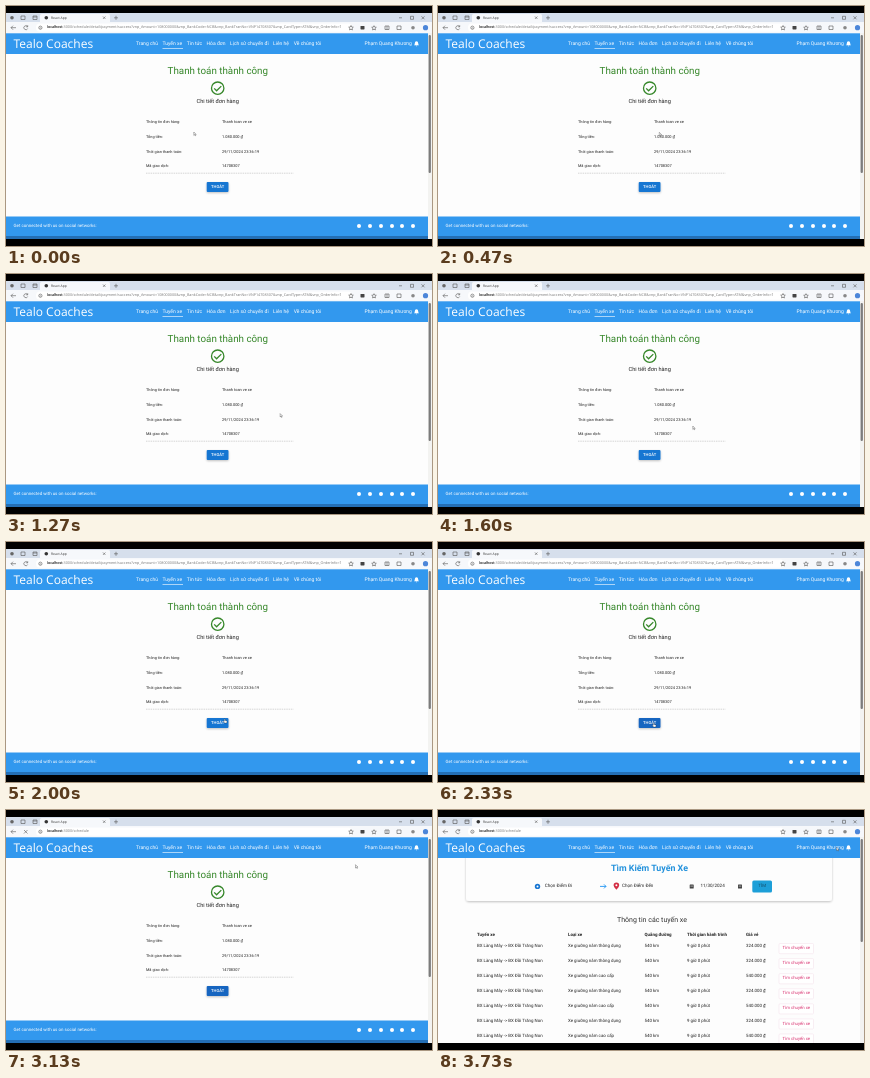
Recreate the animation shown at these times as an HTML page. Size 426 by 240 pixels, loop 3790 ms.

```html
<!DOCTYPE html>
<html lang="vi">
<head>
<meta charset="utf-8">
<style>
  html, body { margin: 0; width: 100%; height: 100%; overflow: hidden; background: #000; }
  svg { display: block; width: 100vw; height: 100vh; font-family: Roboto, sans-serif; }
  text { text-rendering: geometricPrecision; dominant-baseline: central; white-space: pre; }
  .line { fill: none; stroke: #555; stroke-width: .6; }
  .ui { font-family: "Open Sans", sans-serif; }
</style>
</head>
<body>
<svg id="stage" viewBox="0 0 426 240">
  <defs>
    <clipPath id="screen"><rect y="7" width="426" height="226"/></clipPath>
    <clipPath id="field"><rect x="30" y="16" width="305" height="12"/></clipPath>
    <filter id="shadow" x="-20%" y="-30%" width="140%" height="180%">
      <feDropShadow dx="0" dy="1" stdDeviation="1.3" flood-opacity=".24"/>
    </filter>
  </defs>
  <rect width="426" height="240"/>
  <g clip-path="url(#screen)">
    <rect y="7" width="426" height="226" fill="#fdfdfd"/>
    <g id="success"></g>
    <g id="schedule"></g>
    <g id="nav"></g>
    <g id="browser"></g>
    <g id="scroll">
      <rect x="422" y="27" width="4" height="206" fill="#f3f3f1"/>
      <rect id="thumb" x="422.6" y="29" width="2.3" rx="1" fill="#7c7c7c"/>
    </g>
    <g id="cursor">
      <g transform="translate(-1.2 -2) scale(.8)" fill="#fff" stroke="#222" stroke-width=".4">
        <path id="arrow" d="M0 0V4.2L1 3.3 1.7 4.8 2.4 4.5 1.7 3H3Z"/>
        <path id="hand" d="M-.6 .2Q0-.5 .5 .2V2L2.4 2.4Q3 2.6 2.8 3.4L2.3 5H-.3L-1.7 3Q-1.5 2.3-.6 2.8Z"/>
      </g>
    </g>
  </g>
</svg>
<script>
const $ = id => document.getElementById(id);
const text = (x, y, str, size, fill = '#222', extra = '') =>
  `<text x="${x}" y="${y}" font-size="${size}" fill="${fill}" ${extra}>${str}</text>`;
const rect = (x, y, w, h, fill, extra = '') =>
  `<rect x="${x}" y="${y}" width="${w}" height="${h}" fill="${fill}" ${extra}/>`;
const dot = (x, y, r, fill) => `<circle cx="${x}" cy="${y}" r="${r}" fill="${fill}"/>`;
const line = (d, extra = '') => `<path class="line" d="${d}" ${extra}/>`;
const mid = 'text-anchor="middle"', bold = 'font-weight="700"', ui = 'class="ui"';
const blue = '#3298ee', green = '#36872a';

// Browser frame
const path = 'schedule/detail/payment/success?vnp_Amount=108000000&amp;vnp_BankCode=NCB&amp;vnp_BankTranNo=VNP14708307&amp;vnp_CardType=ATM&amp;vnp_OrderInfo=Thanh+toan+ve+xe';
const address = (id, rest) => `<g id="${id}" clip-path="url(#field)">` +
  text(41, 21.9, `localhost:3000/${rest}`, 3.72, '#777', ui) +
  text(41, 21.9, 'localhost', 3.72, '#222', ui) + '</g>';
$('browser').innerHTML =
  rect(0, 7, 426, 9.5, '#d6dfec') + rect(0, 16, 426, 11.3, '#f6f8fb') +
  rect(34, 8, 70, 9, '#f6f8fb', 'rx="1.5"') + rect(30, 17.5, 316, 8.3, '#fff', 'rx="4"') +
  dot(6, 11.8, 1.8, '#666') + line('M15 10h4v3.5h-4zM27 10h4v3.5h-4zM27 11h4') +
  dot(40.3, 11.8, 1.8, '#333') + text(45, 11.8, 'React App', 3.4, '#333', ui) +
  line('M97 10.5l2.4 2.4m0-2.4l-2.4 2.4M108 11.8h4m-2-2v4') +
  line('M393 11.8h3M404.5 10.3h3v3h-3zM415.5 10.3l3 3m0-3l-3 3') +
  line('M10 21.7H5m2-2l-2 2 2 2') +
  line('M21.6 20.7a2 2 0 1 0 .1 1.8M21.7 19.2v1.6h-1.6', 'id="reload"') +
  line('M18 20l3.5 3.5m0-3.5L18 23.5', 'id="stop"') +
  line('M36 21.7a1.6 1.6 0 1 1-3.2 0a1.6 1.6 0 1 1 3.2 0M34.4 21.4v1') +
  address('longUrl', path) + address('shortUrl', 'schedule') +
  line('M345 19.5l.7 1.5 1.6.2-1.2 1.1.3 1.7-1.4-.8-1.4.8.3-1.7-1.2-1.1 1.6-.2z') +
  rect(354.5, 20, 4, 3.4, '#444', 'rx=".6"') +
  line('M368 19.7l.7 1.4 1.6.2-1.2 1.1.3 1.6-1.4-.8-1.4.8.3-1.6-1.2-1.1 1.6-.2zM379 20h4v3.5h-4zM381 20v3.5M391 20h4v3.5h-4z') +
  dot(407, 21.7, 1.8, '#888') + dot(419.5, 21.7, 2.6, '#4c86d9');

// Site header
const links = [[130, 'Trang chủ'], [156.5, 'Tuyến xe'], [180.7, 'Tin tức'], [200.5, 'Hóa đơn'],
  [224, 'Lịch sử chuyến đi'], [267, 'Liên hệ'], [287.7, 'Về chúng tôi']];
$('nav').innerHTML = rect(0, 27, 422, 21, blue) +
  text(7.5, 37.4, 'Tealo Coaches', 12, '#fff', ui) +
  links.map(([x, label]) => text(x, 37.6, label, 5, '#fff')).join('') +
  rect(156.5, 42.3, 20.5, .6, '#fff') + text(358.5, 37.8, 'Phạm Quang Khương', 5, '#fff') +
  '<path d="M408 39.2q.8-.5.8-2 0-1.7 1.7-1.9 1.7.2 1.7 1.9 0 1.5.8 2zM409.8 39.7h1.4l-.7.7z" fill="#fff"/>';

// Payment confirmation
const details = [['Thông tin đơn hàng:', 'Thanh toan ve xe'], ['Tổng tiền:', '1.080.000 ₫'],
  ['Thời gian thanh toán:', '29/11/2024 23:36:19'], ['Mã giao dịch:', '14708307']];
$('success').innerHTML =
  text(211.8, 65, 'Thanh toán thành công', 9.8, green, mid) +
  `<g fill="none" stroke="${green}" stroke-width="1.3"><circle cx="211.7" cy="82.2" r="6.2"/>` +
  '<path d="M208.2 82.4l2.4 2.4 4.7-4.7"/></g>' +
  text(211.7, 95.6, 'Chi tiết đơn hàng', 5.6, '#222', mid) +
  details.map(([label, value], i) =>
    text(140, 115.6 + i * 14.7, label, 3.85) + text(216, 115.6 + i * 14.7, value, 3.95)).join('') +
  line('M140 167.2H287.5', 'stroke-dasharray="1.5 .8" style="stroke:#bbb"') +
  rect(200.7, 176, 21.8, 10, '#1976d2', 'id="exit" rx="1" filter="url(#shadow)"') +
  text(211.6, 181, 'THOÁT', 4.1, '#fff', `${mid} font-weight="500"`) +
  rect(0, 210.5, 422, 19.5, blue) + rect(0, 230, 422, 3, '#246fb5') +
  text(7.5, 220.2, 'Get connected with us on social networks:', 4.45, '#fff') +
  [353, 364, 375, 386, 396, 407].map(x => dot(x, 220, 2, '#fff')).join('');

// Route search and list
const columns = [[39, 'Tuyến xe'], [130, 'Loại xe'], [206.5, 'Quãng đường'], [249, 'Thời gian hành trình'], [308, 'Giá vé']];
const row = (premium, i) => {
  const y = 136 + i * 15.07;
  const cells = ['BX Làng Mây -&gt; BX Đồi Trăng Non', `Xe giường nằm ${premium ? 'cao cấp' : 'thông dụng'}`,
    '540 km', '9 giờ 0 phút', `${premium ? 540 : 324}.000 ₫`];
  return cells.map((cell, c) => text(columns[c][0], y, cell, 4.4)).join('') +
    rect(341, y - 2.5, 34.5, 10.2, '#fff', 'rx="1" stroke="#f3dfe8" stroke-width=".5"') +
    text(358.3, y + 2.7, 'Tìm chuyến xe', 4.3, '#d8306f', mid);
};
const calendar = x => rect(x - 2, 74.5, 4, 4, '#444', 'rx=".5"') + rect(x - 1.3, 75.8, 2.6, .5, '#fff');
$('schedule').innerHTML =
  rect(28, 40, 366, 51, '#fdfdfd', 'rx="3" filter="url(#shadow)"') +
  text(211.5, 58.7, 'Tìm Kiếm Tuyến Xe', 8.85, '#2492dc', `${mid} ${bold}`) +
  dot(99.5, 76.4, 2.7, '#1976d2') + dot(99.5, 76.4, 1, '#fff') + text(106.7, 76.5, 'Chọn Điểm Đi', 4.55) +
  line('M162 76.4h6m-2-2l2 2-2 2', 'style="stroke:#2196f3;stroke-width:.9"') +
  '<path d="M178.4 79.8q-2.8-3.1-2.8-4.4a2.8 2.8 0 0 1 5.6 0q0 1.3-2.8 4.4z" fill="#d32f45"/>' +
  dot(178.4, 75.3, 1, '#fff') + text(184, 76.5, 'Chọn Điểm Đến', 4.55) +
  calendar(253.7) + text(262.5, 76.5, '11/30/2024', 4.55) + calendar(302) +
  rect(314.3, 70.5, 19.7, 12, '#1d9fd8', 'rx="1.5"') + text(324.2, 76.6, 'TÌM', 4.4, '#14506d', mid) +
  text(214, 110, 'Thông tin các tuyến xe', 7, '#333', mid) +
  columns.map(([x, label]) => text(x, 125.3, label, 4.45, '#222', bold)).join('') +
  [0, 0, 1, 0, 1, 0, 1].map(row).join('');

// Playback: pointer stops as [ms, x, y]
const LOOP = 3790, STEP = 1000 / 15;
const stops = [[0, 189, 128], [200, 191, 128], [930, 295, 129], [1600, 256, 154], [2000, 220, 179],
  [2250, 217, 183], [2760, 217, 183], [3130, 362, 46], [3730, 401, 39], [LOOP, 401, 39]];
const ease = p => p * p * (3 - 2 * p);
const show = (id, on) => $(id).style.display = on ? '' : 'none';

function pointer(t) {
  const i = stops.findIndex(s => s[0] > t);
  const [t0, x0, y0] = stops[i - 1], [t1, x1, y1] = stops[i];
  const p = ease((t - t0) / (t1 - t0));
  return [x0 + (x1 - x0) * p, y0 + (y1 - y0) * p];
}

function draw(now) {
  const t = Math.floor(now % LOOP / STEP + 1e-6) * STEP;
  const [x, y] = pointer(t);
  const listed = t >= 3260, leaving = t >= 2930;
  const hover = !listed && x > 200.7 && x < 222.5 && y > 176 && y < 186;
  $('cursor').setAttribute('transform', `translate(${x} ${y})`);
  show('hand', hover);
  show('arrow', !hover);
  show('success', !listed);
  show('schedule', listed);
  show('longUrl', !leaving);
  show('shortUrl', leaving);
  show('stop', leaving && !listed);
  show('reload', !leaving || listed);
  $('exit').setAttribute('fill', t > 2050 ? '#1565c0' : '#1976d2');
  $('thumb').setAttribute('height', listed ? 103 : 138);
  requestAnimationFrame(() => draw(performance.now()));
}
draw(0);
</script>
</body>
</html>
```
